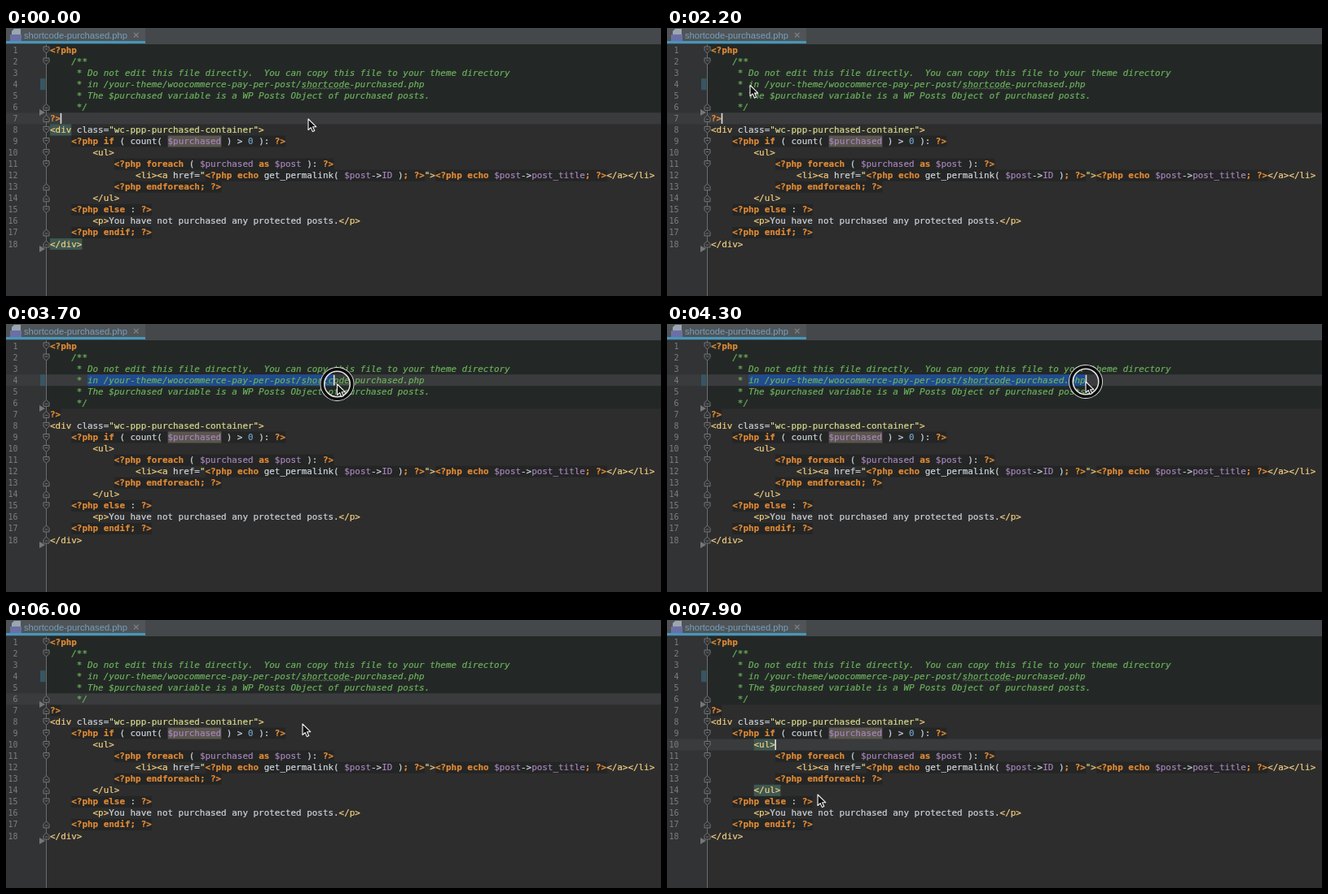
Recreate the animation shown at these times as an HTML page. Size 804 px wide and 330 px high, loop 8 s.

```html
<!DOCTYPE html>
<html lang="en">
<head>
<meta charset="utf-8">
<title>Code editor</title>
<style>
html, body { margin: 0; width: 100%; height: 100%; overflow: hidden; background: #2d2d2d; }
svg { display: block; width: 804px; height: 330px; }
text { white-space: pre; }
.code { font: 10.92px "DejaVu Sans Mono", monospace; color: #cdd5dc; }
.code, .code tspan { fill: currentColor; stroke: currentColor; stroke-width: 0.2px; }
.number { font: 10px "DejaVu Sans Mono", monospace; fill: #7b7f81; text-anchor: end; }
.tab { font: 11.2px "Liberation Sans", Arial, sans-serif; fill: #769fc0; }
.keyword { color: #e08a35; font-weight: bold; }
.variable { color: #a685bb; }
.digit { color: #6f9fc4; }
.tag { color: #f2cf80; }
.string { color: #d8dc8c; }
.comment { color: #6cb05c; font-style: italic; }
</style>
</head>
<body>
<svg id="stage" viewBox="0 0 804 330"></svg>
<script>
const stage = document.getElementById('stage');
const LOOP = 8000, STEP = 100;
const LEFT = 54, CHAR = 6.574, TOP = 20, ROW = 14.06;
const colX = col => LEFT + col * CHAR;
const rowY = line => TOP + (line - 1) * ROW;

const source = [
  '<?php',
  '    /**',
  '     * Do not edit this file directly.  You can copy this file to your theme directory',
  '     * in /your-theme/woocommerce-pay-per-post/shortcode-purchased.php',
  '     * The $purchased variable is a WP Posts Object of purchased posts.',
  '     */',
  '?>',
  '<div class="wc-ppp-purchased-container">',
  '    <?php if ( count( $purchased ) > 0 ): ?>',
  '        <ul>',
  '            <?php foreach ( $purchased as $post ): ?>',
  '                <li><a href="<?php echo get_permalink( $post->ID ); ?>"><?php echo $post->post_title; ?></a></li>',
  '            <?php endforeach; ?>',
  '        </ul>',
  '    <?php else : ?>',
  '        <p>You have not purchased any protected posts.</p>',
  '    <?php endif; ?>',
  '</div>'
];

function add(name, attrs = {}, parent = stage) {
  const node = document.createElementNS('http://www.w3.org/2000/svg', name);
  set(node, attrs);
  return parent.appendChild(node);
}
function set(node, attrs) {
  for (const key in attrs) node.setAttribute(key, attrs[key]);
}
function rect(x, y, width, height, fill, parent) {
  return add('rect', { x, y, width, height, fill }, parent);
}
function cells(line, from, to, fill, parent) {
  return rect(colX(from), rowY(line), (to - from) * CHAR, ROW, fill, parent);
}
function label(x, y, content, className) {
  const node = add('text', { x, y, class: className });
  node.textContent = content;
  return node;
}
const show = (node, on) => node.setAttribute('visibility', on ? 'visible' : 'hidden');

const PHP_BLOCK = /(<\?php.*?\?>|<\?php|\?>)/;
const PHP_TOKEN = /(?<keyword><\?php|\?>|;|\b(?:if|foreach|as|echo|else|endforeach|endif)\b)|(?<variable>\$\w+|\bID\b|\bpost_title\b)|(?<digit>\b\d+)/g;
const HTML_TOKEN = /(?<tag><\/?\w+>?|>)|(?<string>"[\w-]*"?)/g;

function span(parent, content, className) {
  if (!content) return;
  const node = add('tspan', className ? { class: className } : {}, parent);
  node.textContent = content;
}
function highlight(parent, content, pattern) {
  let end = 0;
  for (const match of content.matchAll(pattern)) {
    span(parent, content.slice(end, match.index));
    span(parent, match[0], Object.keys(match.groups).find(key => match.groups[key]));
    end = match.index + match[0].length;
  }
  span(parent, content.slice(end));
}

// Editor background, gutter and embedded PHP shading
rect(0, 0, 804, 330, '#2d2d2d');
rect(0, TOP, 49, 310, '#313335');
rect(49, TOP, 755, 6 * ROW, '#232826');
source.forEach((content, i) => {
  if (i < 6) return;
  let col = 0;
  content.split(PHP_BLOCK).forEach((part, j) => {
    if (j % 2) cells(i + 1, col, col + part.length, '#242525');
    col += part.length;
  });
});

const caretRow = rect(0, 0, 804, ROW, '#393b3c');
rect(42, rowY(4), 6.5, ROW, '#385563');
const divMatch = add('g'), ulMatch = add('g');
cells(8, 0, 4, '#3e5750', divMatch);
cells(18, 0, 6, '#3e5750', divMatch);
cells(10, 8, 12, '#3e5750', ulMatch);
cells(14, 8, 13, '#3e5750', ulMatch);
cells(9, 22, 32, '#5a564e');
const selection = cells(4, 7, 7, '#214b8f');

// Fold guide and markers
rect(49, TOP, 1, 310, '#6a6c6d');
const fold = (line, path) => add('path', {
  d: path, transform: `translate(49.5 ${rowY(line) + 7})`,
  fill: '#2f3133', stroke: '#7b7e80', 'stroke-width': 0.9
});
for (const line of [1, 2, 8, 9, 10, 11, 15]) fold(line, 'M-3.5-4h7v4.5L0 4l-3.5-3.5zM-1.5-1h3');
for (const line of [6, 7, 13, 14, 17, 18]) fold(line, 'M-3.5 4h7v-4.5L0-4l-3.5 3.5zM-1.5 1h3');
for (const y of [104, 272]) add('path', { d: `M41 ${y - 4}l7 4-7 4z`, fill: '#74787a' });

// Text
source.forEach((content, i) => {
  const y = rowY(i + 1) + 10.5;
  label(14.5, y, i + 1, 'number');
  const row = label(LEFT, y, '', 'code');
  if (i > 0 && i < 6) return span(row, content, 'comment');
  content.split(PHP_BLOCK).forEach((part, j) => highlight(row, part, j % 2 ? PHP_TOKEN : HTML_TOKEN));
});
let wave = `M${colX(47)} 75`;
for (let x = 0; x < 9 * CHAR; x += 4) wave += 'l2-1.5 2 1.5';
add('path', { d: wave, fill: 'none', stroke: '#5c8a55', 'stroke-width': 0.8 });

// Tab strip
rect(0, 0, 804, 20, '#45484a');
rect(0, 0, 171, 17, '#505456');
rect(0, 16, 171, 3, '#4497bb');
add('path', { d: 'M10 1h8v13H7V4z', fill: '#9aa7b0' });
rect(5, 8, 14, 8, '#6c6fa5');
label(22, 12.5, 'shortcode-purchased.php', 'tab');
add('path', { d: 'M157 6l5.5 5.5M162.5 6l-5.5 5.5', stroke: '#7c8386', 'stroke-width': 1.1 });

const caret = rect(0, 0, 1.6, 13, '#e0e0e0');
const ring = add('g', { fill: 'none' });
add('circle', { r: 18, stroke: '#e4e4e4', 'stroke-width': 6 }, ring);
add('circle', { r: 18.3, stroke: '#0c0c0c', 'stroke-width': 3.6 }, ring);
const pointer = add('path', {
  d: 'M0 0V13.5L3.2 10.6 5.4 15.6 7.8 14.5 5.6 9.7H9.8Z',
  fill: '#111', stroke: '#f4f4f4', 'stroke-width': 1.1, 'stroke-linejoin': 'round'
});

// Pointer stops: time, x, y
const stops = [
  [0, 371, 112], [300, 371, 112], [1200, 101, 57], [1500, 101, 57],
  [2300, 102, 71], [2700, 102, 72], [2900, 110, 73], [3700, 406.5, 74],
  [4200, 514, 71], [4600, 514, 71], [5000, 545, 96], [5300, 545, 96],
  [6000, 364, 128], [6200, 364, 128], [6800, 150, 153], [7100, 150, 153],
  [7800, 185, 215], [8000, 185, 215]
];
const ease = p => p * p * (3 - 2 * p);

function pointerAt(t) {
  const i = stops.findIndex(stop => stop[0] > t);
  const [t0, x0, y0] = stops[i - 1], [t1, x1, y1] = stops[i];
  const p = ease((t - t0) / (t1 - t0));
  return [x0 + (x1 - x0) * p, y0 + (y1 - y0) * p];
}

function caretAt(t, x) {
  if (t < 2600) return { line: 7, col: 2, since: 0 };
  if (t < 5100) {
    const reach = Math.floor((x - LEFT) / CHAR + 0.1);
    return { line: 4, col: Math.max(7, Math.min(70, reach)), since: Math.min(t, 4200) };
  }
  if (t < 6900) return { line: 6, col: 7, since: 5100 };
  return { line: 10, col: 12, since: 6900 };
}

const between = (t, from, to) => t >= from && t < to;

function render(time) {
  const t = Math.floor(time % LOOP / STEP) * STEP;
  const [x, y] = pointerAt(t);
  const { line, col, since } = caretAt(t, x);
  const selecting = between(t, 2600, 5100);

  set(pointer, { transform: `translate(${x} ${y})` });
  set(ring, { transform: `translate(${x} ${y})` });
  show(ring, between(t, 2600, 4500) || between(t, 5100, 5300) || between(t, 6900, 7100));

  set(caretRow, { y: rowY(line) });
  set(caret, { x: colX(col) - 0.5, y: rowY(line) + 0.5 });
  show(caret, (t - since) % 1000 < 500);
  set(selection, { width: selecting ? (col - 7) * CHAR : 0 });
  show(divMatch, t < 300);
  show(ulMatch, t >= 7100);
}

const start = performance.now();
function tick() {
  render(performance.now() - start);
  requestAnimationFrame(tick);
}
tick();
</script>
</body>
</html>
```
